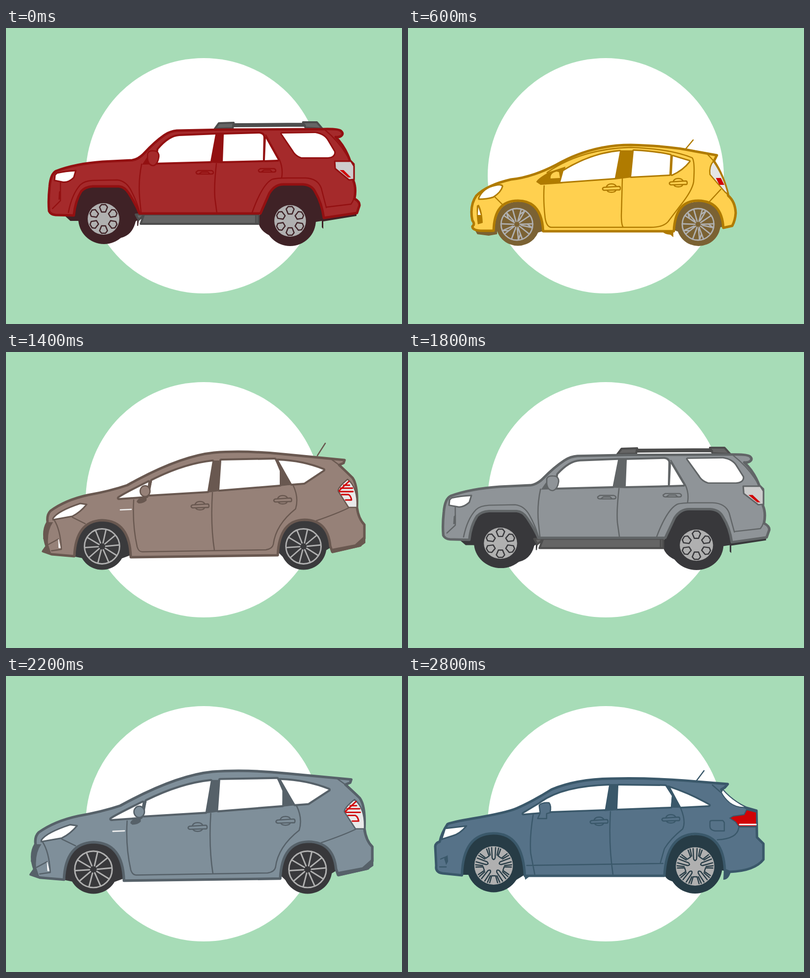
Animation, 800 px wide and 600 px high, one loop 3000 ms. Source, as an HTML page without scripts:

```html
<!DOCTYPE html>
<html lang="en">
<head>
<meta charset="utf-8">
<title>Car line-up</title>
<style>
html, body { margin: 0; width: 100%; height: 100%; overflow: hidden; background: #a7dcb7; }
svg { display: block; width: 100%; height: 100%; }
path, circle, rect { stroke-linejoin: round; stroke-linecap: round; }

/* b body, d outline, t tyre */
.car {
  --d: color-mix(in srgb, var(--b), #000 32%);
  --t: #38383b;
  visibility: hidden;
  animation: show 3s step-end infinite;
  animation-delay: calc(var(--i) * 200ms - 3s);
}
@keyframes show {
  0% { visibility: visible; }
  6.66666%, 100% { visibility: hidden; }
}

.b { fill: var(--b); stroke: var(--d); stroke-width: 5; }
.m { fill: var(--b); stroke: var(--d); stroke-width: 2.5; }
.l { fill: none; stroke: var(--d); stroke-width: 2.4; }
.d { fill: var(--d); }
.t { fill: var(--t); }
.w { fill: #fff; stroke: var(--d); stroke-width: 8; paint-order: stroke; }
.h { fill: #fff; stroke: var(--d); stroke-width: 3; }
.c { fill: #cdcdcd; stroke: var(--d); stroke-width: 3; }
.r { fill: #d00306; }
.rim { fill: #b0b0b0; }
.cut { fill: none; stroke: var(--t); stroke-width: 2.4; }
.spoke { fill: none; stroke: #b0b0b0; stroke-width: 2.8; }
</style>
</head>
<body>
<svg viewBox="0 0 800 600" preserveAspectRatio="none">
<defs>
  <g id="handle">
    <path class="l" d="M-10-3Q-8-9 0-9T10-3M-9 4Q-7 8 0 8T9 4"/>
    <path class="m" d="M-15-2L15-4Q18-4 18 0T15 3L-15 4Q-18 3-18 1T-15-2Z"/>
  </g>

  <!-- wheels -->
  <path id="lug" class="cut" d="M-4-29H4L8-24 4-14H-4L-8-24Z"/>
  <g id="rimA">
    <circle class="rim" r="32"/>
    <use href="#lug"/><use href="#lug" transform="rotate(60)"/><use href="#lug" transform="rotate(120)"/>
    <use href="#lug" transform="rotate(180)"/><use href="#lug" transform="rotate(240)"/><use href="#lug" transform="rotate(300)"/>
  </g>

  <path id="vee" class="spoke" d="M-2-6L-11-30M2-6L11-30M-1-9L-3-31M-7-20L-3-31"/>
  <g id="rimB">
    <circle class="spoke" r="32"/>
    <use href="#vee" transform="rotate(36)"/><use href="#vee" transform="rotate(108)"/><use href="#vee" transform="rotate(180)"/>
    <use href="#vee" transform="rotate(252)"/><use href="#vee" transform="rotate(324)"/>
  </g>

  <path id="fork" class="spoke" d="M-2-7L-6-26-10-33M2-7L6-26 10-33M-6-26L-1-33M6-26L1-33"/>
  <g id="rimC">
    <circle class="spoke" r="34.5"/>
    <use href="#fork" transform="rotate(18)"/><use href="#fork" transform="rotate(90)"/><use href="#fork" transform="rotate(162)"/>
    <use href="#fork" transform="rotate(234)"/><use href="#fork" transform="rotate(306)"/>
  </g>

  <path id="pair" class="spoke" d="M-3-7L-13-32M2-7L8-34"/>
  <g id="rimD">
    <circle class="spoke" r="35.5"/>
    <use href="#pair"/><use href="#pair" transform="rotate(72)"/><use href="#pair" transform="rotate(144)"/>
    <use href="#pair" transform="rotate(216)"/><use href="#pair" transform="rotate(288)"/>
  </g>

  <path id="claw" class="cut" d="M-9-32L-5-29V-21L0-17 5-21V-29L9-32"/>
  <g id="claws"><use href="#claw" transform="rotate(22.5)"/><use href="#claw" transform="rotate(112.5)"/></g>
  <g id="rimE">
    <circle class="rim" r="38"/><circle class="cut" r="12"/>
    <use href="#claws"/><use href="#claws" transform="rotate(45)"/>
    <use href="#claws" transform="rotate(180)"/><use href="#claws" transform="rotate(225)"/>
  </g>

  <path id="slot" class="cut" d="M0-31V-10M-6 30L-4 19Q0 13 4 19L6 30"/>
  <g id="rimF">
    <circle class="rim" r="34"/>
    <use href="#slot"/><use href="#slot" transform="rotate(72)"/><use href="#slot" transform="rotate(144)"/>
    <use href="#slot" transform="rotate(216)"/><use href="#slot" transform="rotate(288)"/>
  </g>

  <path id="fan" class="cut" d="M-4-36L-3-15Q0-9 3-15L4-36M-10-35L-7-21M10-35L7-21M-8 35L-4 21H4L8 35"/>
  <g id="rimG">
    <circle class="rim" r="39"/>
    <use href="#fan"/><use href="#fan" transform="rotate(72)"/><use href="#fan" transform="rotate(144)"/>
    <use href="#fan" transform="rotate(216)"/><use href="#fan" transform="rotate(288)"/>
  </g>

  <!-- boxy off-roader -->
  <g id="offroad">
    <path class="t" d="M118 380L130 391H146L198 420 228 426Q255 422 262 392L265 390V401H267L270 376Q262 357 248 335 240 322 228 321H175Q160 322 152 331 140 350 137 380ZM509 385L514 376 532 335Q543 317 560 317H600Q618 318 625 333 638 355 642 385L708 376V381L641 392V407L638 404V391L626 393 540 424Q508 412 509 385Z"/>
    <circle class="t" cx="198" cy="386" r="52"/><circle class="t" cx="574" cy="390" r="52"/>
    <path d="M262 378H510V397H272L278 380 268 389Z" fill="#656565" stroke="#4d4d4d" stroke-width="4"/>
    <path d="M505 379V396" stroke="#4d4d4d" stroke-width="3"/>
    <path d="M422 204L430 193 460 192 458 203ZM600 191L628 191 639 204 605 202ZM461 195L601 194 604 198 460 199Z" fill="#656565" stroke="#4d4d4d" stroke-width="4"/>
    <path class="b" d="M87 371Q85 350 88 322 90 296 101 290 140 275 195 271L255 268Q268 266 280 253 300 231 320 217 332 209 345 208L440 206 640 205Q672 204 677 209 682 214 678 218 674 222 666 221 685 240 695 269L702 276V310Q708 325 704 346 715 352 714 360L709 375 642 385Q638 355 625 333 618 318 600 317H560Q543 317 532 335L514 376H270Q262 357 248 335 240 322 228 321H175Q160 322 152 331 140 350 137 380L100 379Q90 378 87 371Z"/>
    <path class="l" d="M126 374Q133 337 150 318 158 310 175 309L225 308Q243 310 253 330 265 353 270 374M274 276Q267 310 270 345L273 375M425 275Q420 320 422 345L426 375M553 268Q560 285 557 303M497 375Q517 318 537 307 545 304 570 304H605Q630 305 637 325L647 364M648 363L697 357Q706 345 705 325M645 207Q678 235 694 268M94 366L110 350V312M525 217L553 268"/>
    <path class="d" d="M107 332L111 328V347L106 348ZM424 212H441L438 274 412 273ZM275 277L288 257 304 276Z"/>
    <path class="w" d="M303 273L308 246Q330 220 350 219L423 216 413 270ZM440 216L512 214Q520 215 520 222L519 268 438 270ZM525 224L549 267 523 268Z"/>
    <path class="w" style="stroke-width:6" d="M557 214L625 213Q643 216 650 229L663 251Q664 261 650 262H597Q585 258 580 248Z"/>
    <path class="m" d="M286 255Q288 248 298 249 309 249 309 260 307 276 298 279 288 279 286 265Z"/>
    <path class="m" d="M388 289H415Q419 290 419 293T415 296H388Q384 296 384 292ZM514 285H541Q545 286 545 289T541 292H514Q510 292 510 288Z"/>
    <path class="l" d="M391 295L395 292H408L412 296M517 291L521 288H534L538 292"/>
    <path class="h" d="M99 298L103 294Q120 290 141 289L137 303Q125 315 113 312L98 309Z"/>
    <path class="c" d="M664 270H697L703 280V307L693 308 665 285Z"/><path class="r" d="M674 288H682L697 303H691Z"/>
    <use href="#rimA" x="197" y="387"/><use href="#rimA" x="574" y="391"/>
  </g>

  <!-- compact hatchback -->
  <g id="hatch">
    <path class="t" d="M136 411H180V418L163 421 140 418ZM175 411Q176 353 222 352T272 412L250 418ZM538 410Q540 353 587 352T636 403L560 418Z"/>
    <circle class="t" cx="222" cy="397" r="44.5"/><circle class="t" cx="587" cy="397.5" r="44.5"/>
    <path class="d" d="M514 412H536V424L530 419Q517 418 514 412Z"/>
    <path class="l" d="M561 245L576 227"/>
    <path class="b" d="M130 402Q136 398 130 390 124 360 138 340 160 318 208 307 250 303 300 277 370 237 450 237 530 239 580 250L624 258 618 270Q637 298 647 340 661 352 662 375 661 390 655 401L637 405Q634 351 587 350T537 412H273Q270 350 222 350T173 411H147Q130 410 130 402Z"/>
    <path class="l" d="M281 293Q350 245 450 242 530 245 574 263 580 270 577 312 574 330 550 360L525 393Q515 404 490 404H290Q280 404 277 385 273 350 275 320M433 305L431 380Q431 400 435 404M605 256L618 270M632 327L608 353M173 340L190 357"/>
    <path class="d" d="M259 312Q262 305 285 292L318 281 312 315 268 318ZM428 248H456L451 303 418 307Z"/>
    <path class="w" style="stroke-width:6" d="M308 312L314 290Q370 255 428 250L418 304ZM456 249Q500 251 530 258L528 297 451 301ZM535 260L568 270Q555 287 533 297Z"/>
    <path class="b" style="stroke:none" d="M288 305Q287 294 300 291L305 292 307 304Z"/>
    <use href="#handle" x="411" y="325"/><use href="#handle" x="546" y="314"/>
    <path class="h" d="M143 344Q152 324 176 319 190 316 191 321 188 333 172 343 160 347 143 347Z"/>
    <path class="d" d="M139 360L143 358Q150 370 151 395L141 398Q138 380 139 360Z"/><path d="M142 363L147 379H141Z" fill="#fff"/>
    <path class="m" style="fill:#e5e5e5" d="M617 270Q608 280 610 297L640 332 647 338Q638 300 617 270Z"/><path class="r" d="M622 304H632L639 318H629Z"/>
    <use href="#rimB" x="220" y="398"/><use href="#rimB" x="586" y="398"/>
  </g>

  <!-- sedan -->
  <g id="sedan">
    <path class="t" d="M144 405Q144 344 195 343T251 405ZM548 405Q550 344 600 343T659 404Z"/>
    <circle class="t" cx="196" cy="396" r="46"/><circle class="t" cx="600" cy="396" r="46"/>
    <path class="t" d="M135 411L146 405 144 416 138 420ZM242 402L258 407 255 420H251ZM648 400L662 403Q660 417 652 416Z"/>
    <path class="b" d="M73 402Q72 398 79 390 73 352 80 337 100 310 160 295 200 286 235 282 243 277 252 276 330 229 400 223 500 219 550 231 600 246 650 271L700 276Q708 278 709 286L715 297V324Q728 345 727 360 727 385 718 392L660 405Q655 342 600 342 550 343 546 410L257 411 250 400Q246 342 195 342 143 344 142 411L100 408Z"/>
    <path class="l" d="M264 305Q260 345 270 378 273 390 285 390H515Q525 390 528 380 540 350 570 328 592 305 594 290 590 280 581 275M426 295Q421 330 424 388M628 344Q680 341 700 320M715 295L680 295Q665 295 664 299 685 312 704 322H716M145 325L170 343"/>
    <path class="d" d="M249 304Q250 297 270 287L289 270 294 284 293 303ZM424 234H443L440 293 415 296ZM84 371Q96 368 101 382L111 399 101 396Q96 378 84 371Z"/>
    <path class="w" d="M294 298V287L290 273Q340 242 424 236L415 292ZM443 236L528 243Q558 256 579 275L534 287 440 290Z"/>
    <path class="d" d="M249 304Q260 290 290 273L294 284V299Z"/>
    <path id="grip" class="l" d="M371 314Q373 309 382 310T401 310Q413 309 413 313T402 317 382 318Q373 319 371 314Z"/>
    <use href="#grip" x="160" y="-9"/>
    <path class="h" style="stroke-width:2" d="M94 331Q110 318 145 320L148 325Q125 337 103 345L100 335Z"/>
    <path d="M684 302L715 301" stroke="#fff" stroke-width="3"/>
    <use href="#rimC" x="196" y="396"/><use href="#rimC" x="600" y="396"/>
  </g>

  <!-- tall wagon -->
  <g id="wagon">
    <path class="t" d="M140 415Q142 342 194 342T251 412L235 418 160 419ZM550 406Q552 342 603 342T658 395L640 406 560 416Z"/>
    <circle class="t" cx="194" cy="395" r="46.5"/><circle class="t" cx="601" cy="395" r="46.5"/>
    <path class="b" d="M75 404L82 394Q72 365 84 345 82 330 90 322 120 300 165 290 210 282 245 270 350 211 420 204 480 199 560 207L684 219 682 225 673 229Q690 245 700 255 711 270 709 315 712 338 724 350V378L716 392 659 405 655 393Q650 341 603 340 552 341 549 412L252 416Q250 342 194 341 141 343 138 414L92 410Z"/>
    <path class="d" d="M72 405L81 392 75 378 83 345H95Q83 362 85 390L92 411ZM658 399L705 390 726 371V387L715 395 659 408ZM416 220H436L431 282 407 285ZM541 217H549L579 269 553 272Z"/>
    <path class="l" d="M258 300Q255 350 265 395 268 405 275 405L525 401Q538 399 540 390 545 350 585 318 592 295 580 270M417 285Q413 350 421 402M134 335L160 348M97 340Q110 360 112 400L92 403M86 390L106 379M627 342Q670 327 692 316M658 218L673 229"/>
    <path class="w" d="M228 296Q240 288 288 264L284 292ZM295 261Q360 228 417 222L407 282 290 289ZM435 220L543 218 555 240 553 269 431 279ZM549 220Q600 222 641 239L602 265 577 267Z"/>
    <path class="d" d="M288 262H295L290 282 283 292ZM543 217H549L578 269 553 271V241Z"/>
    <ellipse class="m" cx="281" cy="282" rx="10" ry="11"/>
    <path class="d" d="M264 304Q266 294 284 294V301Q278 307 268 307Z"/>
    <use href="#handle" x="392" y="312"/><use href="#handle" x="559" y="300"/>
    <path d="M231 320L253 319" stroke="#eee" stroke-width="2.5"/>
    <path class="h" d="M95 337Q105 322 150 307L163 309Q150 325 134 333L95 340Z"/><path d="M106 380L110 397H107Z" stroke="#fff" fill="#fff"/>
    <path class="m" style="fill:#e9e9e9" d="M690 258Q670 275 671 282L692 315H709Q711 275 690 258Z"/>
    <path d="M673 281L693 262M682 270H694M676 276H700M674 283H701M678 289H692Q697 292 698 300H686" fill="none" stroke="#d00306" stroke-width="2.8"/>
    <use href="#rimD" x="194" y="394"/><use href="#rimD" x="601" y="394"/>
  </g>

  <!-- pickup -->
  <g id="pickup">
    <path class="t" d="M56 388Q60 320 85 312H145Q163 312 170 320 187 350 193 406L180 420Q165 427 155 426L80 400ZM551 392Q553 360 562 335 572 315 590 312H650Q668 312 672 320 683 350 688 376L670 400 590 426Q555 428 545 390Z"/>
    <circle class="t" cx="121" cy="384" r="57"/><circle class="t" cx="622" cy="384" r="57"/>
    <path class="d" d="M209 393H215V403H210ZM252 393H277L275 400H257ZM398 393H534Q522 401 500 401H425Q405 400 398 393ZM684 370L697 384 692 414 687 415ZM738 382L762 379V387L741 391Z"/>
    <path class="b" d="M13 342L18 336Q17 325 27 315L30 285Q33 272 45 267 90 255 180 252 215 220 250 196 265 184 330 183 420 179 500 185 515 187 520 205 526 225 528 254L768 257Q772 262 767 270L763 346H778Q783 362 774 378L690 386Q683 350 672 320 668 312 650 312H590Q572 315 562 335 553 360 551 392H200L193 406Q187 350 170 320 163 312 145 312H85Q62 318 56 390H40Q13 387 13 365Z"/>
    <path class="l" d="M190 250Q250 200 275 192 370 186 475 192 500 195 505 215L514 260Q515 345 502 381L207 384 195 350Q190 300 196 252M355 262Q348 320 355 381M511 253H528M525 257Q528 330 515 380M45 276Q60 268 145 264 158 260 160 255M714 381L747 347H763"/>
    <path class="d" d="M349 196H374L369 262 338 264Z"/>
    <path class="w" style="stroke-width:9" d="M232 261L245 230Q280 201 349 199L339 259ZM373 199L470 201Q478 202 479 208L483 245Q483 253 475 254L369 258Z"/>
    <path class="d" d="M203 264Q202 256 225 236L238 229H245L248 250Q247 258 235 257L232 264Z"/>
    <circle class="l" cx="552" cy="305" r="12"/><circle class="l" cx="566" cy="306" r="2"/>
    <g id="pull"><path class="l" d="M319 275L323 270H335L339 275M319 283L323 288H335L339 283"/><path class="c" style="stroke-width:2.5" d="M311 276H348V282L311 281Z"/></g>
    <use href="#pull" x="161" y="-1"/>
    <path class="c" d="M14 342H56L55 390H40Q14 386 14 365ZM33 277Q41 270 42 275L35 305 28 320 18 337Q18 322 27 316ZM199 284L203 281H222V292H199Z"/>
    <path class="t" d="M18 346L27 349 29 360 26 368 18 370 22 360Z"/>
    <path class="h" d="M40 282L72 281V290Q58 306 34 311Z"/>
    <path class="r" style="stroke:var(--d);stroke-width:3" d="M748 278L764 270 768 300 764 326 748 316Z"/><path d="M750 287H767V306H750Z" fill="#fff"/>
    <path d="M766 290L760 292V300L766 304" fill="none" stroke="#bbb" stroke-width="2.5"/>
    <use href="#rimE" x="120" y="384"/><use href="#rimE" x="621" y="384"/>
  </g>

  <!-- large family car -->
  <g id="family">
    <path class="t" d="M124 393L130 400 140 394 230 417Q247 417 249 402 246 345 225 330 212 325 185 325 155 325 145 335 130 355 127 393ZM511 402Q512 365 525 340 535 325 565 324 585 323 600 328 632 340 633 399L629 405 620 394 545 418Q515 418 511 402Z"/>
    <circle class="t" cx="187" cy="391.5" r="49.5"/><circle class="t" cx="574" cy="394" r="48"/>
    <path d="M364 210Q373 203 387 203L500 201H522L608 204 636 212Z" fill="#333"/>
    <path d="M397 208H498M524 208H603" stroke="#fff" stroke-width="2.4"/>
    <path class="b" style="stroke-width:4" d="M89 350Q90 340 101 335L104 300Q108 292 125 286 165 272 237 271 290 228 330 216 350 211 370 211L640 212 672 217 668 225H663Q690 260 696 280 703 295 701 320L700 334Q713 338 711 352L709 377Q708 384 702 385L633 399Q632 340 600 328 585 323 565 324 535 325 525 340 512 365 511 402H249Q246 345 225 330 212 325 185 325 155 325 145 335 130 355 127 393 98 391 92 380Z"/>
    <path class="l" d="M262 279Q310 228 350 220L515 218Q528 225 540 265L548 325M258 280Q255 340 262 380L268 391 483 388 508 398M402 278Q398 340 402 387M105 300Q125 288 200 285 225 283 237 273M101 335H130M92 354Q103 352 103 362 102 372 92 369M679 308V333M619 338Q640 334 700 334M650 214L665 226"/>
    <path class="d" d="M393 223H419L416 278 386 278ZM262 281L285 257 305 278Z"/>
    <path class="w" style="stroke-width:7" d="M303 276V246Q330 228 395 225L387 275ZM419 225L490 224Q502 225 507 232L519 262Q520 271 510 272L416 275ZM529 223L600 226Q618 228 630 240L648 265Q649 271 640 271H560Q550 270 546 262Z"/>
    <path class="m" d="M283 254L302 251 305 274H287Q280 268 283 254Z"/>
    <use href="#handle" x="379" y="296"/><use href="#handle" x="520" y="293"/>
    <path class="h" style="stroke-width:2" d="M113 300L142 297Q132 315 122 322L110 325Z"/>
    <path class="r" style="stroke:var(--d);stroke-width:2" d="M664 284Q672 281 698 283L702 292 700 311 694 313Q670 303 664 284Z"/>
    <use href="#rimF" x="188" y="391"/><use href="#rimF" x="575" y="394"/>
  </g>

  <!-- crossover -->
  <g id="cross">
    <path class="t" d="M110 403Q112 322 172 320T237 402L200 425 122 403ZM518 402Q522 324 580 322T640 395L634 394 550 418Q522 418 518 402Z"/>
    <circle class="t" cx="173" cy="384" r="54.5"/><circle class="t" cx="580" cy="386" r="55"/>
    <path class="d" d="M234 402H251L237 413ZM638 393L652 397Q648 413 637 413Z"/>
    <path class="b" d="M55 345Q56 338 64 336 68 318 80 300 90 296 130 289 200 277 220 268 250 255 290 230 340 209 410 208 480 206 560 212L646 219 640 226 633 230Q650 252 683 267L704 273 705 327 718 340V372Q700 395 650 397L640 393Q637 321 580 320 522 322 518 405H236Q232 318 172 319 111 320 109 404L70 400Q55 398 57 385Z"/>
    <path class="l" d="M253 280Q245 330 248 360L256 402M240 384L515 380M409 275Q405 340 414 402M551 268Q562 295 555 310 530 330 518 350L510 378M625 332Q665 330 668 308M615 221L632 236M610 296Q610 293 614 293H636L639 297V314H620Q610 312 610 305ZM66 371L78 366M64 387H77M668 306H704"/>
    <path class="d" d="M405 219H426L422 272 397 274ZM73 370L80 363 81 376 77 383Z"/>
    <path class="w" style="stroke-width:7" d="M233 279L266 259Q310 225 406 222L398 270 290 274ZM425 222L520 223 533 243 531 265 423 269ZM528 226Q570 240 608 262L551 265Z"/>
    <path class="d" d="M520 222H528L552 267H531L533 243Z"/>
    <path class="m" d="M265 262Q270 256 285 257 290 263 287 277L280 279V289H262L267 278Z"/>
    <use href="#handle" x="386" y="295"/><use href="#handle" x="531" y="290"/>
    <path class="h" d="M75 309L118 304Q105 320 90 324L68 331Z"/>
    <path class="h" style="stroke-width:2" d="M636 230Q655 252 683 266 665 268 650 257 639 248 633 236Z"/>
    <path class="r" style="stroke:var(--d);stroke-width:2" d="M650 288L657 284 679 281 684 271 704 276V305H668L662 296Z"/><path d="M670 301H703" stroke="#fff" stroke-width="3"/>
    <use href="#rimG" x="173" y="384"/><use href="#rimG" x="580" y="386"/>
  </g>
</defs>

<rect width="800" height="600" fill="#a7dcb7"/>
<circle cx="399.5" cy="299.5" r="238.5" fill="#fff"/>

<g class="car" style="--i:0;--b:#a52a2b;--d:#931011;--t:#3f2226"><use href="#offroad"/></g>
<g class="car" style="--i:1;--b:#7d8a94"><use href="#sedan" transform="matrix(.979 0 0 1.036 1.5 -15.9)"/></g>
<g class="car" style="--i:2;--b:#4f7a8c"><use href="#sedan" transform="matrix(1.032 0 0 .973 -13.2 11.9)"/></g>
<g class="car" style="--i:3;--b:#ffd04f;--d:#b07b00;--t:#7b6233"><use href="#hatch"/></g>
<g class="car" style="--i:4;--b:#a69f94"><use href="#family" transform="matrix(1.054 0 0 1 -22.8 0)"/></g>
<g class="car" style="--i:5;--b:#cf0404;--d:#950f10;--t:#551a1c"><use href="#sedan"/></g>
<g class="car" style="--i:6;--b:#9c4a40"><use href="#cross" transform="matrix(.981 0 0 1.01 20 -5)"/></g>
<g class="car" style="--i:7;--b:#968178;--d:#695850;--t:#3a3a3c"><path class="l" d="M629 210L645 185"/><use href="#wagon"/></g>
<g class="car" style="--i:8;--b:#6f7b68"><use href="#pickup" transform="matrix(.955 0 0 .954 22.5 21.2)"/></g>
<g class="car" style="--i:9;--b:#8f9498"><use href="#offroad" transform="matrix(1.05 0 0 .988 -20 5.3)"/></g>
<g class="car" style="--i:10;--b:#865143;--d:#683730;--t:#452e2f"><use href="#pickup"/></g>
<g class="car" style="--i:11;--b:#7f8f9a"><use href="#wagon" transform="matrix(1.063 0 0 1.041 -29.6 -18.2)"/></g>
<g class="car" style="--i:12;--b:#838383;--d:#4d4d4d;--t:#383739"><use href="#family"/></g>
<g class="car" style="--i:13;--b:#a08c6a"><use href="#offroad" transform="matrix(1.07 0 0 .957 -31.9 20)"/></g>
<g class="car" style="--i:14;--b:#567288;--d:#3a586a;--t:#273c46"><path class="l" d="M583 212L598 192"/><use href="#cross"/></g>
</svg>
</body>
</html>
```
